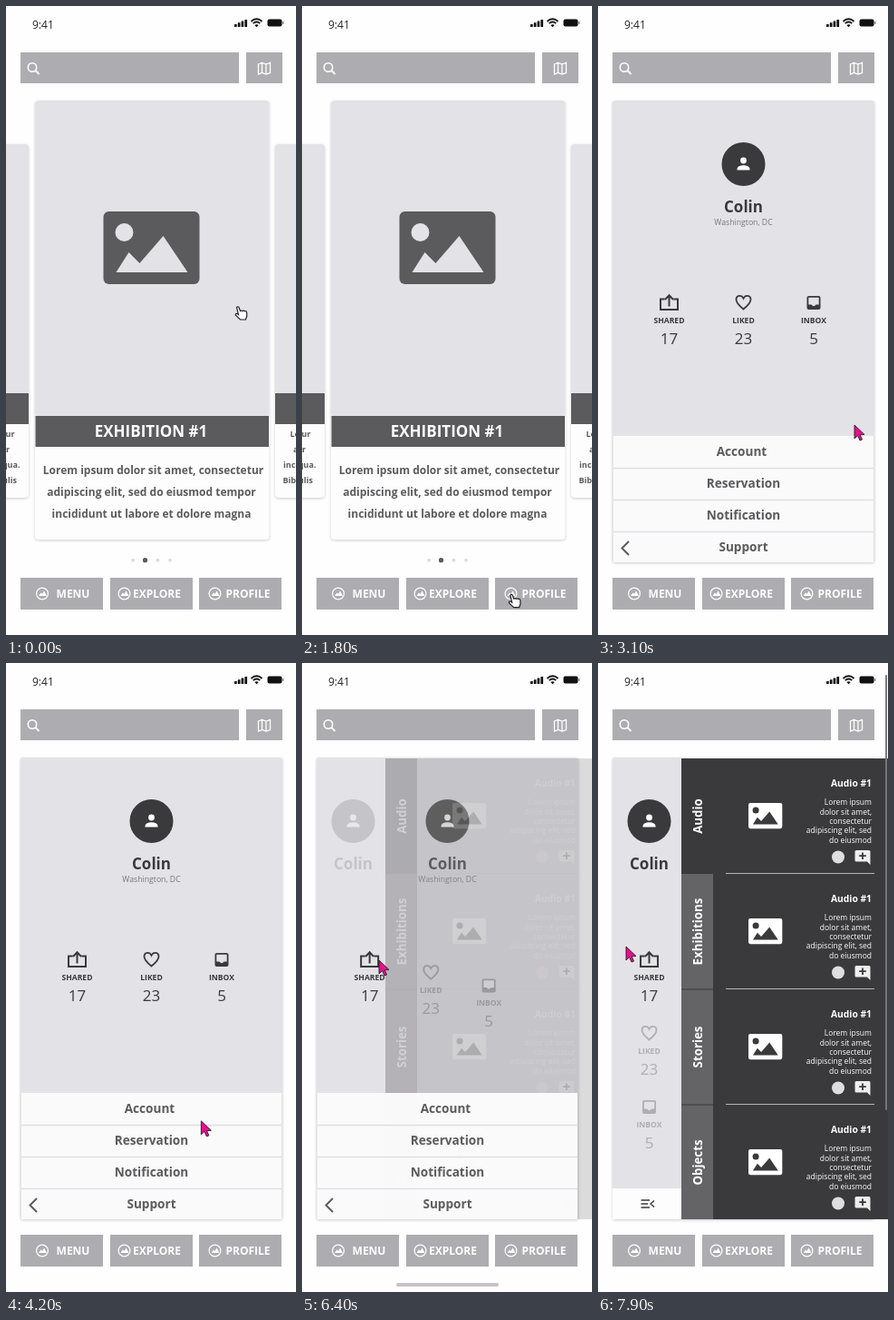
These frames come from a looping animation (320 by 692 pixels, 8000 ms). An HTML page:

```html
<!DOCTYPE html>
<html lang="en">
<head>
<meta charset="utf-8">
<title>Museum app prototype</title>
<style>
html, body { margin: 0; width: 100%; height: 100%; overflow: hidden; background: #fefefe; }
svg { display: block; width: 100vw; height: 100vh; font-family: "Open Sans", sans-serif; }
.card { filter: drop-shadow(0 1px 1.5px #0003); }
</style>
</head>
<body>
<svg id="stage" viewBox="0 0 320 692"></svg>
<script>
const GREY = '#adacb1', LIGHT = '#e3e2e7', MID = '#5b5a5c', DARK = '#3a393b', WHITE = '#fdfdfd';
const stage = document.getElementById('stage');

const rect = (x, y, w, h, fill, more = '') =>
  `<rect x="${x}" y="${y}" width="${w}" height="${h}" fill="${fill}" ${more}/>`;
const circle = (x, y, r, fill, more = '') => `<circle cx="${x}" cy="${y}" r="${r}" fill="${fill}" ${more}/>`;
const line = (d, color, width = 1, more = '') =>
  `<path d="${d}" fill="none" stroke="${color}" stroke-width="${width}" ${more}/>`;
const shape = (d, fill) => `<path d="${d}" fill="${fill}"/>`;
const text = (x, y, s, size, fill, weight = 700, anchor = 'middle', more = '') =>
  `<text x="${x}" y="${y}" font-size="${size}" fill="${fill}" font-weight="${weight}" text-anchor="${anchor}" ${more}>${s}</text>`;
const group = (id, body, more = '') => `<g id="${id}" ${more}>${body}</g>`;
const at = (x, y, body, scale = 1) => `<g transform="translate(${x} ${y}) scale(${scale})">${body}</g>`;

// Picture placeholder, 106 x 80
const picture = (fill, hole) => rect(0, 0, 106, 80, fill, 'rx="6"') + circle(23, 23, 10, hole) +
  shape('M14 67L28 45L40 57L66 27L93 67Z', hole);

function header() {
  let s = text(29, 25, '9:41', 12, '#222', 400, 'start');
  for (let i = 0; i < 4; i++) s += rect(252 + i * 3.8, 20 - i * 1.7, 2.7, 3 + i * 1.7, '#111', 'rx=".6"');
  s += line('M270.5 17Q276.500 11.500 282.500 17M272.700 19.200Q276.500 15.800 280.300 19.200', '#111', 1.8);
  s += shape('M274.500 21.200Q276.500 19.500 278.500 21.200L276.500 23.300Z', '#111');
  s += rect(288.5, 14.5, 16, 8, '#111', 'rx="2"') + rect(305.2, 17, 1.2, 3, '#777');
  s += rect(16, 51, 241, 34, GREY) + rect(265, 51, 40, 34, GREY);
  s += circle(29, 67.5, 4.7, 'none', 'stroke="#fff" stroke-width="1.6"') + line('M32.500 71L36.500 75', '#fff', 1.8);
  return s + line('M278.500 64L282.500 62.500L287 64L291.500 62.500V73.500L287 75L282.500 73.500L278.500 75ZM282.500 62.500V73.500M287 64V75', '#fff', 1.3);
}

function footer() {
  return [[16, 40, 'MENU', 74], [115, 130.5, 'EXPLORE', 166.5], [213, 230.5, 'PROFILE', 267]].map(([x, icon, label, mid]) =>
    rect(x, 629, 91, 35, GREY) +
    circle(icon, 646.5, 6.4, 'none', 'stroke="#fff" stroke-width="1.2"') +
    shape(`M${icon - 4} 649l2.500 -3.500l1.500 1.500l2 -3.500l3 5.500z`, '#fff') +
    text(mid, 651, label, 12, '#fff')).join('');
}

function sideCard(x, textX, anchor, words) {
  return rect(x, 152, 60, 389, WHITE, 'rx="4" class="card"') + rect(x, 152, 60, 275, LIGHT, 'rx="4"') +
    rect(x, 426, 60, 34, MID) +
    words.map((w, i) => text(textX[i], 474 + i * 17, w, 9, MID, 700, anchor)).join('');
}

function home() {
  const lines = [[162.5, 'Lorem ipsum dolor sit amet, consectetur'],
    [160.5, 'adipiscing elit, sed do eiusmod tempor'], [160.5, 'incididunt ut labore et dolore magna']];
  return sideCard(-35, [9.5, 4, 15.5, 12], 'end', ['ur', 'r', 'qua.', 'ulis']) +
    sideCard(297, [313.5, 317, 306, 305.5], 'start', ['Lorem', 'adip', 'incididunt', 'Biben']) +
    rect(32, 104, 258.5, 483, WHITE, 'rx="4" class="card"') + rect(32, 104, 258.5, 348, LIGHT, 'rx="4"') +
    at(107.5, 226, picture(MID, LIGHT)) +
    rect(32.5, 451, 257.5, 34, MID) + text(160, 474, 'EXHIBITION #1', 17, '#fff') +
    lines.map(([x, s], i) => text(x, 515 + i * 24, s, 12, MID)).join('') +
    [140, 153.5, 167.5, 181].map((x, i) => circle(x, 609.7, i == 1 ? 2.6 : 2, i == 1 ? MID : '#dddce0')).join('');
}

const person = x => circle(x, 174, 24, DARK) + circle(x, 170, 3.4, '#fff') +
  shape(`M${x - 7} 180.500v-1.500q1 -3.700 7 -3.700t7 3.700v1.500z`, '#fff') + text(x, 227, 'Colin', 17, DARK);

const rows = () => rect(17, 473, 287, 139, '#fbfafb') +
  ['Account', 'Reservation', 'Notification', 'Support'].map((s, i) =>
    (i ? line(`M17 ${473.5 + 35 * i}H304`, '#dfdee2', 1.4) : '') +
    text(i ? 160.5 : 158.5, 495 + 35 * i, s, 13.6, MID)).join('') +
  line('M34 589L26.500 596.500L34 604', MID, 2);

const icons = [
  line('M-5 -3.500H-9.500V8H9.500V-3.500H5M0 4.500V-7M-4.500 -3L0 -7.700L4.500 -3', DARK, 2),
  line('M0 7.500C-5 3.500 -8 .5 -8 -3C-8 -8 -2 -8.500 0 -4.300C2 -8.500 8 -8 8 -3C8 .5 5 3.500 0 7.500Z', DARK, 1.8),
  rect(-7.5, -7, 15, 15, DARK, 'rx="2"') + shape('M-5.700 -5.200H5.700V2.500H2.500Q0 6 -2.500 2.500H-5.700Z', LIGHT)
];
const stats = [['SHARED', 17, 78.5], ['LIKED', 23, 160.5], ['INBOX', 5, 238]];
const statBody = ([label, n], i) => icons[i] + text(0, 23, label, 8.6, DARK) + text(0, 46, n, 17, DARK, 400);

function sharedList() {
  const body = ['Lorem ipsum', 'dolor sit amet,', 'consectetur', 'adipiscing elit, sed', 'do eiusmod'];
  let s = '';
  for (let i = 0; i < 4; i++) {
    s += at(0, 127 * i,
      at(166, 154, picture('#fff', DARK), .352) + text(302, 136, 'Audio #1', 10.3, '#fff', 700, 'end') +
      body.map((b, j) => text(302, 156.3 + 10.3 * j, b, 8.5, '#fff', 400, 'end')).join('') +
      circle(265, 213.5, 7, '#dedde0') +
      shape('M285 206H299Q300.500 206 300.500 207.500V222L297 218.500H285Q283.500 218.500 283.500 217V207.500Q283.500 206 285 206Z', '#eee') +
      line('M292 208.500V216M288.200 212.200H295.800', DARK, 1.8) +
      (i < 3 ? line('M141 231.500H305', '#b5b4b8', 1) : ''));
  }
  return s;
}

const tabs = () => ['Audio', 'Exhibitions', 'Stories', 'Objects'].map((s, i) => {
  const y = 105 + 127 * i;
  return rect(92, y, 35, 127, i ? '#646366' : DARK) + (i > 1 ? line(`M92 ${y}H127`, DARK, 1) : '') +
    text(0, 0, s, 13.3, '#fff', 700, 'middle', `transform="translate(115 ${y + 63.5}) rotate(-90)"`);
}).join('');

stage.innerHTML = `<clipPath id="clip">${rect(0, 0, 320, 612, '#000')}</clipPath>` +
  header() +
  group('panel', rect(16, 104, 289, 508, LIGHT, 'rx="3" class="card"')) +
  group('home', home()) +
  group('avatar', person(160.5) + text(160.5, 241, 'Washington, DC', 8.7, '#77767a', 400)) +
  group('backdrop', rect(92, 105, 228, 507, DARK)) +
  group('list', sharedList(), 'clip-path="url(#clip)"') +
  group('tabs', tabs(), 'clip-path="url(#clip)"') +
  group('side', rect(16, 578, 76, 34, WHITE) + person(56.5) +
    line('M47.500 591H57M47.500 595H55M47.500 599H57M62 591.500L58 595L62 598.500', DARK, 1.4)) +
  group('rows', rows()) +
  stats.map((s, i) => group('stat' + i, statBody(s, i))).join('') +
  footer() +
  group('scrollbar', rect(317, 13, 2, 479, '#777679', 'rx="1"')) +
  group('homeBar', rect(104, 682, 113, 4, '#c4c3c6', 'rx="2"')) +
  group('hand', '<path d="M-1.500 .5Q0 -1 1 .5L2.500 4.500Q4 3.500 5 4.600Q6.500 3.700 7.300 4.800Q9.300 4.200 9.600 6L9.800 10L8.500 14H2.500L-2.800 9Q-3 7 -.8 7.600L.5 8.500Z" fill="#fff" stroke="#222" stroke-width="1.2"/>') +
  group('arrow', '<path d="M0 0V15L3.600 11.600L6 17L8.500 16L6.200 10.800L11 10.500Z" fill="#e6108c" stroke="#2a1a2a" stroke-width=".9"/>');

const el = {};
stage.querySelectorAll('g[id]').forEach(g => el[g.id] = g);

const clamp = v => Math.max(0, Math.min(1, v));
const smooth = v => (v = clamp(v), v * v * (3 - 2 * v));
const fade = (id, o) => el[id].setAttribute('opacity', clamp(o));
const place = (id, x, y) => el[id].setAttribute('transform', `translate(${x} ${y})`);

// Pointer tip: time, x, y
const path = [[0, 256, 331], [900, 129, 638], [1200, 129, 638], [2100, 267, 651], [2500, 267, 651],
  [3100, 283, 461], [3700, 283, 461], [5100, 51, 608], [5500, 51, 608], [6200, 85, 327], [6600, 85, 327],
  [7700, 31, 312], [8000, 31, 312]];

function pointer(t) {
  const i = path.findIndex(k => k[0] > t), [t0, x0, y0] = path[i - 1], [t1, x1, y1] = path[i];
  const p = smooth((t - t0) / (t1 - t0));
  return [x0 + (x1 - x0) * p, y0 + (y1 - y0) * p];
}

function draw(t) {
  const open = smooth((t - 2300) / 300), share = smooth((t - 6320) / 300);
  fade('panel', open);
  fade('home', 1.4 * (1 - open));
  fade('avatar', open * (1 - 1.5 * share));
  fade('rows', open * 1.2 * (1 - share));
  ['backdrop', 'list', 'tabs', 'side'].forEach(id => fade(id, share));
  stats.forEach(([, , x], i) => {
    place('stat' + i, x + (56.5 - x) * share, 326 + 81 * i * share);
    fade('stat' + i, open * (i ? Math.max(.3, 1 - 4 * share) : 1));
  });
  fade('scrollbar', share == 1 ? 1 : 0);
  fade('homeBar', share > 0 && share < 1 ? 1 : 0);

  const [x, y] = pointer(t);
  const onStat = x > 60 && x < 98 && y > 315 && y < 375;
  const hot = t < 2300 || (t > 2700 && t < 6320 && (y > 578 || onStat));
  place('hand', x, y);
  place('arrow', x, y);
  fade('hand', hot ? 1 : 0);
  fade('arrow', hot ? 0 : 1);
}

const start = performance.now();
function tick() {
  const t = (performance.now() - start) % 8000;
  draw(Math.floor(t / 100) * 100);
  requestAnimationFrame(tick);
}
tick();
</script>
</body>
</html>
```
